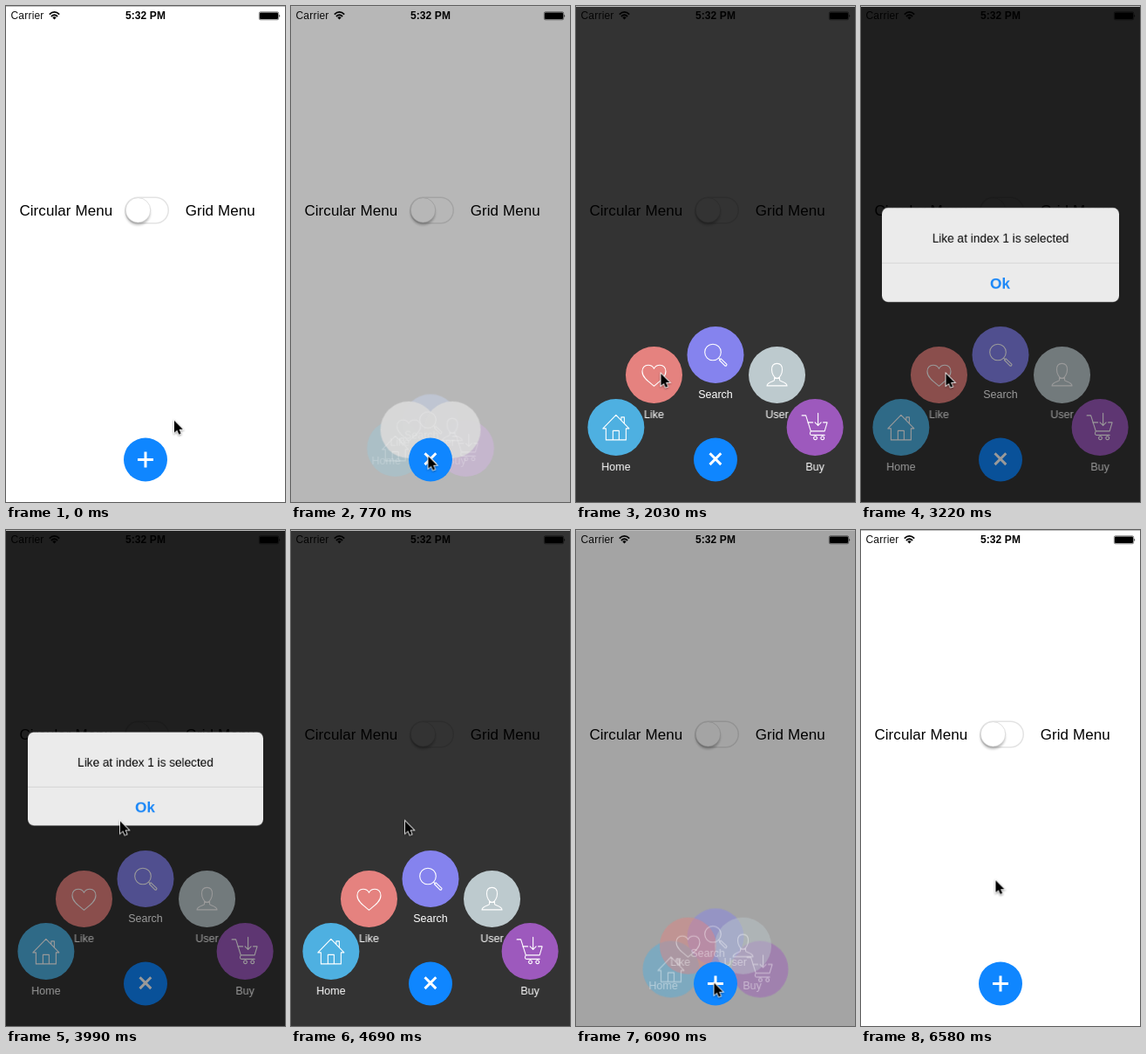
An HTML page that plays this animation: 320x568 px, repeating every 6.65 s.

```html
<!DOCTYPE html>
<html lang="en">
<head>
<meta charset="utf-8">
<title>Circular menu</title>
<style>
  html, body { margin: 0; width: 100%; height: 100%; overflow: hidden; background: #fff; }
  svg { display: block; width: 320px; height: 568px; font-family: "Liberation Sans", Arial, sans-serif; }

  .shade, .tint, .fade, .fly, .plus, .cross, .dim, .alert, .cursor {
    animation: 6650ms ease-in-out infinite;
  }
  .shade { animation-name: shade; }
  .tint { animation-name: fly, tint; }
  .fade { animation-name: fly, fade; }
  .plus { animation-name: plus; animation-timing-function: step-end; }
  .cross { animation-name: cross; animation-timing-function: step-end; }
  .dim { animation-name: dim; }
  .alert { animation-name: alert; transform-origin: 160px 285px; }
  .cursor { animation-name: cursor; filter: drop-shadow(0 1px 1px rgba(0, 0, 0, .4)); }

  .icon { fill: none; stroke: #fff; stroke-width: 1.1; stroke-linejoin: round; stroke-linecap: round; }
  .label { fill: #fff; font-size: 12.5px; text-anchor: middle; }

  @keyframes shade {
    0%, 8.95% { opacity: 0; }
    15.34%, 88.42% { opacity: .8; }
    94.4%, 100% { opacity: 0; }
  }
  @keyframes fly {
    0%, 8.95% { transform: translate(var(--x), var(--y)); }
    15.34%, 88.42% { transform: translate(0px, 0px); }
    94.4%, 100% { transform: translate(var(--x), var(--y)); }
  }
  @keyframes tint {
    0%, 8.95% { opacity: 0; fill: var(--pale); }
    11.58% { opacity: var(--mid); fill: var(--pale); }
    15.34%, 88.42% { opacity: 1; fill: var(--color); }
    94.4%, 100% { opacity: 0; fill: var(--color); }
  }
  @keyframes fade {
    0%, 8.95% { opacity: 0; }
    11.58% { opacity: .25; }
    15.34%, 88.42% { opacity: 1; }
    94.4%, 100% { opacity: 0; }
  }
  @keyframes plus {
    0% { opacity: 1; }
    9.4% { opacity: 0; }
    88.4%, 100% { opacity: 1; }
  }
  @keyframes cross {
    0% { opacity: 0; }
    9.4% { opacity: 1; }
    88.4%, 100% { opacity: 0; }
  }
  @keyframes dim {
    0%, 43.61% { opacity: 0; animation-timing-function: ease-out; }
    48%, 66.02% { opacity: .4; }
    70.23%, 100% { opacity: 0; }
  }
  @keyframes alert {
    0%, 43.61% { opacity: 0; transform: scale(1.2); animation-timing-function: cubic-bezier(.2, .6, .3, 1); }
    47.5% { opacity: 1; }
    50.8% { transform: scale(1); }
    66.02% { opacity: 1; transform: scale(1); }
    70.23%, 100% { opacity: 0; transform: scale(1); }
  }
  @keyframes cursor {
    0% { transform: translate(193px, 474.7px); }
    4.21%, 25.41% { transform: translate(157.5px, 515.7px); }
    30.53%, 53.84% { transform: translate(97.5px, 421px); }
    60%, 71.73% { transform: translate(131px, 333.5px); }
    77.9%, 98.9% { transform: translate(158.5px, 518.7px); }
    98.91%, 100% { transform: translate(154.5px, 401.2px); }
  }
</style>
</head>
<body>
<svg viewBox="0 0 320 568">
  <defs>
    <filter id="soft" x="-50%" y="-50%" width="200%" height="200%">
      <feGaussianBlur stdDeviation="1.6"/>
    </filter>
  </defs>
  <rect width="320" height="568" fill="#fff"/>

  <!-- status bar -->
  <text x="5.5" y="15" font-size="12" letter-spacing=".2" fill="#111">Carrier</text>
  <g fill="none" stroke="#000" stroke-width="1.8">
    <path d="M49.8 9.6Q55.5 4.2 61.2 9.6M51.9 12Q55.5 8.6 59.1 12"/>
    <path d="M53.3 13.2Q55.5 11.4 57.7 13.2L55.5 15.6Z" fill="#000" stroke="none"/>
  </g>
  <text x="160" y="15" font-size="12" font-weight="bold" letter-spacing=".1" text-anchor="middle">5:32 PM</text>
  <rect x="290.3" y="6.8" width="22.4" height="9" rx="1.6" fill="none" stroke="#000" stroke-width=".5"/>
  <rect x="291" y="7.5" width="21" height="7.6" rx="1"/>
  <path d="M313.4 9.7Q315.2 11.3 313.4 12.9Z"/>

  <!-- mode switch -->
  <g font-size="17" letter-spacing=".08">
    <text x="15.4" y="240">Circular Menu</text>
    <text x="205.7" y="240">Grid Menu</text>
  </g>
  <rect x="136.75" y="219.25" width="49.5" height="29.5" rx="14.75" fill="#fff" stroke="#e3e3e3" stroke-width="1.5"/>
  <circle cx="151.3" cy="236.8" r="14" opacity=".28" filter="url(#soft)"/>
  <circle cx="151.5" cy="233.8" r="14.2" fill="#fff" stroke="#ccc" stroke-width=".6"/>

  <rect class="shade" width="320" height="568"/>

  <g id="discs"></g>
  <g id="icons"></g>

  <circle cx="160" cy="519.5" r="25" fill="#0f86ff"/>
  <g stroke="#fff" stroke-width="3">
    <path class="plus" d="M151 519.5H169M160 510.5V528.5"/>
    <path class="cross" d="M153.5 512.3L166.3 525.1M166.3 512.3L153.5 525.1"/>
  </g>

  <!-- alert -->
  <rect class="dim" width="320" height="568"/>
  <g class="alert" text-anchor="middle">
    <rect x="25" y="231.5" width="270" height="107" rx="7" fill="#ebebeb"/>
    <path d="M25 294.5H295" stroke="#d6d6d6"/>
    <text x="160" y="270.5" font-size="13.6">Like at index 1 is selected</text>
    <text x="159.5" y="323.3" font-size="17" font-weight="bold" fill="#1484f8">Ok</text>
  </g>

  <rect width="320" height="1" fill="#bdbdbd"/>

  <path class="cursor" d="M0 0V13.8L3.2 10.9L5.3 15.8L7.7 14.8L5.6 10H9.9Z"
        stroke="#fff" stroke-width="1.6" paint-order="stroke"/>
</svg>

<script>
  const hub = { x: 160, y: 519.5 };
  const reach = 120;

  // slot: position on the arc, from left to right
  const items = [
    { slot: 0, name: "Home", color: "#4eb0e1", pale: "#98cddf", mid: .38,
      icon: "M-11.5 1.5H-15L0-14L15 1.5H11.5M-11.5 1.5V14.5H11.5V1.5" +
            "M-3.5 14.5V4H3.5V14.5M6-8V-11.5H9.5V-4.5" },
    { slot: 4, name: "Buy", color: "#9d59bd", pale: "#dcb5f1", mid: .38,
      icon: "M-15-13.5H-10.5L-4.8 4.5H11L14-5.5H9.5M-8.3-5.5H-2.5M-4.8 4.5C-7 8-5 9-3 9H11" +
            "M3.5-16V-2M0-5.5L3.5-2L7-5.5" +
            "M-1.5 12.3a1.9 1.9 0 1 0 3.8 0a1.9 1.9 0 1 0-3.8 0M6.7 12.3a1.9 1.9 0 1 0 3.8 0a1.9 1.9 0 1 0-3.8 0" },
    { slot: 2, name: "Search", color: "#8583ee", pale: "#cddcff", mid: .38,
      icon: "M-12.3-3a9.3 9.3 0 1 0 18.6 0a9.3 9.3 0 1 0-18.6 0M3.6 3.6L5.2 5.2" +
            "M4.5 6L6.2 4.3L13 10.8Q13 12.8 11 12.6Z" },
    { slot: 1, name: "Like", color: "#e5827f", pale: "#d9d9d9", mid: .95,
      icon: "M0 12.8C-6 8-13.5 3-13.5-4C-13.5-8.5-10.5-11.2-6.8-11.2C-3.8-11.2-1.2-9.8 0-7.2" +
            "C1.2-9.8 3.8-11.2 6.8-11.2C10.5-11.2 13.5-8.5 13.5-4C13.5 3 6 8 0 12.8Z" },
    { slot: 3, name: "User", color: "#bdcace", pale: "#d9d9d9", mid: .95,
      icon: "M0-13C-4.5-13-6-10-6-6C-6-1-3 4 0 4C3 4 6-1 6-6C6-10 4.5-13 0-13Z" +
            "M-3 3V6C-3 7.5-11.5 8-11.5 12.5H11.5C11.5 8 3 7.5 3 6V3" }
  ];

  function add(parent, tag, attrs, vars) {
    const el = document.createElementNS("http://www.w3.org/2000/svg", tag);
    for (const k in attrs) el.setAttribute(k, attrs[k]);
    for (const k in vars) el.style.setProperty("--" + k, vars[k]);
    return parent.appendChild(el);
  }

  const discs = document.getElementById("discs");
  const icons = document.getElementById("icons");

  for (const { slot, name, color, pale, mid, icon } of items) {
    const angle = (18 + 36 * slot) * Math.PI / 180;
    const dx = reach * Math.cos(angle);
    const dy = reach * Math.sin(angle);
    const cx = hub.x - dx;
    const cy = hub.y - dy;
    const home = { x: dx + "px", y: dy + "px" };

    add(discs, "circle", { class: "tint", cx, cy, r: 32.5 }, { ...home, color, pale, mid });

    const holder = add(icons, "g", { class: "fade" }, home);
    add(holder, "path", { class: "icon", d: icon, transform: `translate(${cx} ${cy})` });

    // labels gather slightly left of the hub
    const label = add(icons, "text", { class: "label fade", x: cx, y: cy + 49.4 },
      { x: dx - 16 + "px", y: dy - 48 + "px" });
    label.textContent = name;
  }
</script>
</body>
</html>
```
